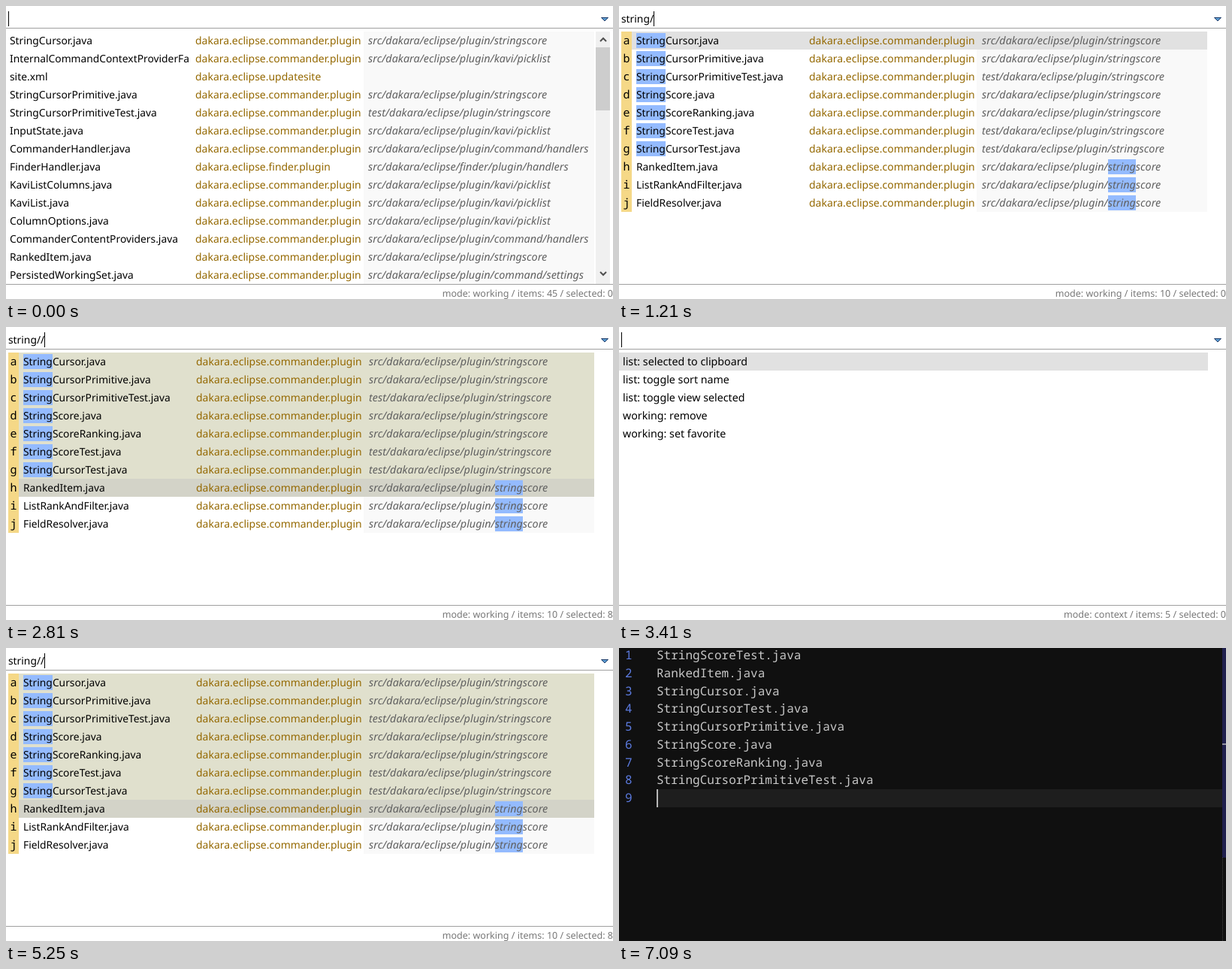
Recreate the animation shown at these times as an HTML page. Size 808 px wide and 390 px high, loop 7290 ms.

```html
<!DOCTYPE html>
<html lang="en">
<head>
<meta charset="utf-8">
<title>Quick finder</title>
<style>
html, body { margin: 0; width: 100%; height: 100%; overflow: hidden; background: #fff; }
#stage { position: relative; width: 808px; height: 390px; overflow: hidden; text-rendering: geometricPrecision; }
#stage div, #stage svg { position: absolute; white-space: pre; }
.finder { inset: 0; background: #fff; color: #000; font: 13.82px/26px "Noto Sans", "Open Sans", sans-serif; }
.query { left: 3px; top: 5px; }
.caret { position: absolute; top: 2px; width: 1px; height: 20px; background: #000; }
.rule { left: 0; width: 808px; height: 1px; background: #a0a0a0; }
.status { right: 0; top: 371px; color: #777; font-size: 12.55px; line-height: 24px; }
.rows { left: 0; top: 34px; width: 784px; height: 336px; overflow: hidden; }
.row { left: 0; width: 783px; height: 24px; }
.row div { top: 0; height: 24px; overflow: hidden; }
.name { left: 5px; width: 238px; }
.pack { left: 252px; width: 221px; color: #946800; font-size: 13.98px; }
.path { left: 476px; width: 301px; padding-left: 6px; color: #606060; background: #f9f9f9; font-size: 14.4px; font-style: italic; }
.keyed .row { left: 17px; width: 766px; }
.keyed .name { left: 6px; width: 220px; }
.keyed .pack { left: 236px; }
.keyed .path { left: 459px; padding-left: 7px; width: 300px; }
.row .key { left: -14px; width: 14px; text-align: center; background: #f5d887; font: 15px/25px "Noto Sans Mono", monospace; }
.row.active { background: #e1e1e1; }
.row.picked { background: #e0e0cd; }
.row.active.picked { background: #d3d3c8; }
.active .path, .picked .path { background: none; }
.hit { background: linear-gradient(#94bbff, #94bbff) 0 50% / 100% 20px no-repeat; display: inline-block; height: 24px; vertical-align: top; }
.menu { font-size: 14.25px; }
.menu .row { width: 784px; }
.menu .name { width: 500px; }
.bar { left: 785px; top: 34px; width: 19px; height: 336px; background: #f0f0f0; }
.thumb { left: 0; top: 21px; width: 19px; background: #cdcdcd; }
.editor { inset: 0; background: #101010; color: #c8c8c8; font: 16.05px/23.75px "Noto Sans Mono", monospace; }
.editor .line { left: 50px; }
.editor .num { left: 8px; color: #5c7be0; }
.editor .current { left: 50px; right: 0; height: 23.75px; background: #1e1e1e; }
.editor .cursor { left: 50px; width: 2px; height: 23.75px; background: #b8b8b8; }
.editor .margin { left: 803px; top: 0; height: 390px; border-left: 1px dotted #444; }
.editor .change { left: 803px; top: 0; width: 5px; height: 279px; background: #20204e; }
.editor .mark { left: 803px; width: 5px; height: 2px; background: #9090a0; }
.editor .blank { color: #6262f0; font-family: "Liberation Mono", monospace; }
</style>
</head>
<body>
<div id="stage"></div>
<script>
const LOOP = 7290;
const stage = document.getElementById("stage");

const home = "dakara.eclipse.commander.plugin";
const score = "src/dakara/eclipse/plugin/stringscore";
const list = "src/dakara/eclipse/plugin/kavi/picklist";
const command = "src/dakara/eclipse/plugin/command/";
const file = (name, path = score, pack = home) => ({ name: name + ".java", pack, path });
const test = name => file(name, score.replace("src", "test"));

const site = { name: "site.xml", pack: "dakara.eclipse.updatesite", path: "" };
const cursor = file("StringCursor");
const primitive = file("StringCursorPrimitive");
const primitiveTest = test("StringCursorPrimitiveTest");
const ranked = file("RankedItem");
const input = file("InputState", list);
const columns = file("KaviListColumns", list);
const kavi = file("KaviList", list);
const options = file("ColumnOptions", list);
const providers = file("CommanderContentProviders", command + "handlers");
const saved = file("PersistedWorkingSet", command + "settings");
const filter = file("ListRankAndFilter");

const all = [
  cursor, file("InternalCommandContextProviderFactory", list), site, primitive, primitiveTest, input,
  file("CommanderHandler", command + "handlers"),
  file("FinderHandler", "src/dakara/eclipse/finder/plugin/handlers", "dakara.eclipse.finder.plugin"),
  columns, kavi, options, providers, ranked, saved
];
const strings = [
  cursor, primitive, primitiveTest, file("StringScore"), file("StringScoreRanking"),
  test("StringScoreTest"), test("StringCursorTest")
];
const found = [...strings, ranked, filter, file("FieldResolver")];
const startsWithS = [cursor, site, ...strings.slice(1), input, columns, kavi, options, providers, saved];
const containsSt = [...strings, input, kavi, columns, saved, filter, ranked, found[9]];
const actions = [
  "list: selected to clipboard", "list: toggle sort name", "list: toggle view selected",
  "working: remove", "working: set favorite"
].map(name => ({ name }));
const pasted = [5, 7, 0, 6, 1, 3, 4, 2].map(i => found[i].name);

const box = (cls, html = "", style = "") => `<div class="${cls}" style="${style}">${html}</div>`;

function mark(text, term) {
  const at = term ? text.toLowerCase().indexOf(term) : -1;
  if (at < 0) return text;
  const end = at + term.length;
  return `${text.slice(0, at)}<span class="hit">${text.slice(at, end)}</span>${text.slice(end)}`;
}

function row(item, i, s) {
  const term = s.query.split("/")[0];
  const inName = item.name.toLowerCase().includes(term);
  const cls = "row" + (i === s.active ? " active" : "") + (i < s.picked ? " picked" : "");
  const cells = [
    s.keyed ? box("key", String.fromCharCode(97 + i)) : "",
    box("name", mark(item.name, term)),
    item.pack ? box("pack", item.pack) + box("path", mark(item.path, inName ? "" : term)) : ""
  ];
  return box(cls, cells.join(""), `top:${24 * i}px`);
}

function scrollbar(count) {
  const chevron = (y, dir) => `<path d="M6 ${y}l4 ${4 * dir}l4 ${-4 * dir}" fill="none" stroke="#505050" stroke-width="2"/>`;
  return box("bar", box("thumb", "", `height:${Math.floor(293 * 13 / count)}px`) +
    `<svg width="19" height="336">${chevron(13, -1)}${chevron(320, 1)}</svg>`);
}

function finder(s) {
  const cls = (s.keyed ? "keyed " : "") + (s.mode === "context" ? "menu " : "");
  return box("finder",
    box("query", s.query + (s.caret ? '<span class="caret"></span>' : "")) +
    '<svg style="left:791px;top:14px" width="12" height="8"><path d="M1.5 1.5h9l-4.5 4.5z" fill="#5b9bd0" stroke="#223f6b"/></svg>' +
    box("rule", "", "top:29px") +
    box(cls + "rows", s.items.map((item, i) => row(item, i, s)).join("")) +
    (s.count > 14 ? scrollbar(s.count) : "") +
    box("rule", "", "top:370px") +
    box("status", `mode: ${s.mode} / items: ${s.count} / selected: ${s.picked}`));
}

function editor(s) {
  const y = i => `top:${-2 + 23.75 * i}px`;
  const last = s.lines.length;
  const numbers = Array.from({ length: last + 1 }, (_, i) => box(last ? "num" : "num blank", i + 1, y(i)));
  return box("editor",
    box("current", "", y(last)) + numbers.join("") +
    s.lines.map((text, i) => box("line", text, y(i))).join("") +
    box("margin") +
    (last ? box("change") + box("mark", "", `top:${s.markY}px`) : "") +
    (s.caret ? box("cursor", "", y(last)) : ""));
}

// Each step overrides part of the state before it.
const working = { view: finder, mode: "working", query: "", items: all, count: 45, active: -1, picked: 0, keyed: false, caret: true };
const chosen = { mode: "working", query: "string//", items: found, count: 10, active: 7, picked: 8, keyed: true, caret: true };
const steps = [
  [0, working],
  [200, { query: "s", items: startsWithS, count: 44, active: 0 }],
  [390, { query: "st", items: containsSt, count: 24 }],
  [610, { query: "stri", items: found, count: 10 }],
  [810, { query: "string" }],
  [1010, { query: "string/" }],
  [1210, { keyed: true }],
  [1410, { query: "string//" }],
  [1610, { picked: 1 }],
  [2010, { query: "string//-" }],
  [2610, { caret: false }],
  [2810, chosen],
  [3410, { mode: "context", query: "", items: actions, count: 5, active: 0, picked: 0, keyed: false }],
  [4030, { caret: false }],
  [4230, chosen],
  [4850, { caret: false }],
  [5250, { caret: true }],
  [5450, { view: editor, lines: [] }],
  [5870, { caret: false }],
  [6070, { lines: pasted, markY: 210, caret: true }],
  [6270, { markY: 127 }],
  [6470, { caret: false }],
  [7090, { caret: true }]
];
let state = {};
const scenes = steps.map(([at, change]) => ({ at, state: state = { ...state, ...change } }));

let shown;
function draw() {
  const t = performance.now() % LOOP;
  const scene = scenes.findLast(s => s.at <= t);
  if (scene !== shown) {
    shown = scene;
    stage.innerHTML = scene.state.view(scene.state);
  }
  requestAnimationFrame(draw);
}
draw();
</script>
</body>
</html>
```
